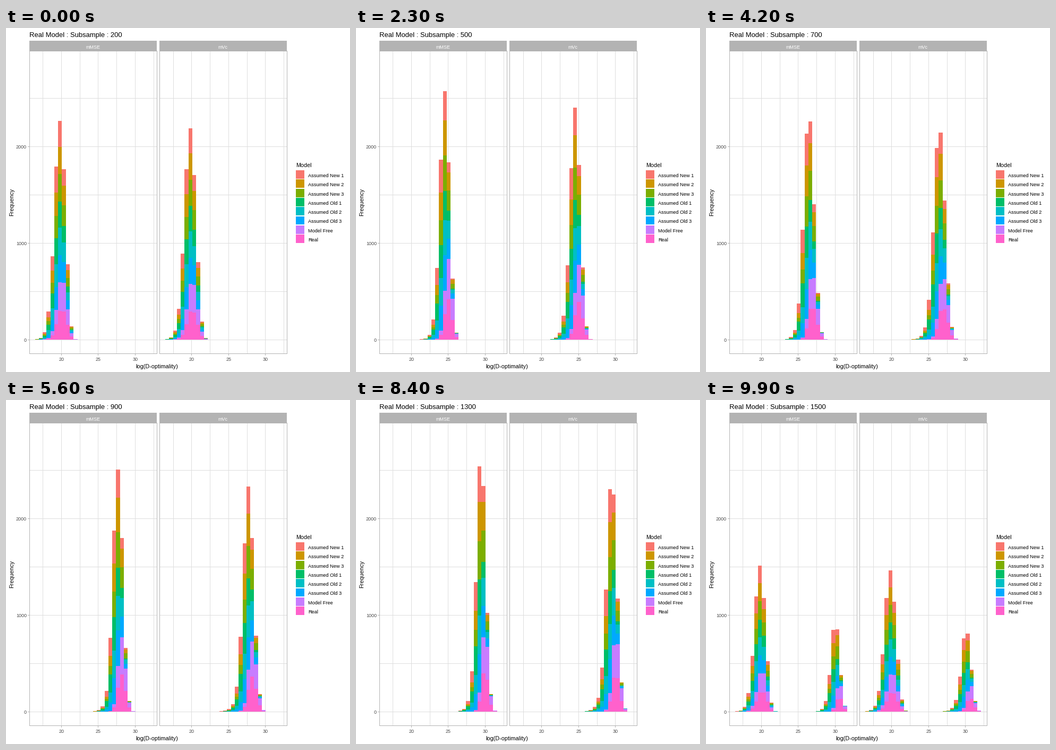
Recreate the animation shown at these times as a matplotlib script. Size 648 by 648 pixels, loop 10000 ms.

```python
import math
import numpy as np
import matplotlib as mpl
import matplotlib.pyplot as plt
from matplotlib.animation import FuncAnimation
from matplotlib.collections import PolyCollection
from matplotlib.patches import Rectangle

mpl.rcParams["font.family"] = "Liberation Sans"

STAGE = 648
GREY, GRID, TICK = "#B3B3B3", "#DEDEDE", "#4D4D4D"
MODELS = ["Assumed New 1", "Assumed New 2", "Assumed New 3", "Assumed Old 1",
          "Assumed Old 2", "Assumed Old 3", "Model Free", "Real"]
COLORS = ["#F8766D", "#CD9600", "#7CAE00", "#00BE67",
          "#00BFC4", "#00A9FF", "#C77CFF", "#FF61CC"]

# Timing in frames of 100 ms: every size holds, then moves to the next one
FRAMES, HOLD = 100, 4
SIZES = range(200, 1600, 100)
STEPS = [4] * 3 + [3] * 11
STARTS = [HOLD * (i + 1) + sum(STEPS[:i]) for i in range(len(STEPS))]

# Histogram geometry in pixels
EDGES = np.arange(31)
BIN_W = 7.278
BASE, PER_COUNT = 587, 0.182

# Each model's offset from the common median, and how much narrower it is
SHIFT = np.array([-.68, -.2, -.07] * 2 + [1.1, 1.03])
SHARP = np.array([.1] * 6 + [.4] * 2)

# growth: median and slope as quadratics in log(size / 200)
PANELS = [
    dict(name="mMSE", left=44.0, first_edge=55.0, bend=.013,
         median=(-.125, 9.95, 6.42), slope=(-.017, .13, .725)),
    dict(name="mVc", left=289.4, first_edge=300.5, bend=.008,
         median=(-.125, 9.99, 6.41), slope=(-.012, .09, .70)),
]

phi = np.vectorize(lambda z: 0.5 * (1 + math.erf(z / math.sqrt(2))))


def bin_shares(mid, slope, tail, bend):
    """Share of a skewed bell curve in each bin: long left tail, short right."""
    u = EDGES - mid
    z = np.where(u < 0, slope * np.arcsinh(tail * u) / tail,
                 slope * u + bend * u ** 3)
    return np.diff(phi(z))


def counts(panel, size):
    """Counts per model and bin for one subsample size."""
    grow = math.log(size / 200)
    mid = np.polyval(panel["median"], grow)
    slope = np.polyval(panel["slope"], grow)
    shape = (.26 + .12 * grow, panel["bend"])
    spread = .5 + .5 * math.sqrt(grow)
    parts = np.array([bin_shares(mid + spread * d, slope * (1 + spread * s), *shape)
                      for d, s in zip(SHIFT, SHARP)]) + 1e-9
    return 8000 * bin_shares(mid, slope, *shape) * parts / parts.sum(axis=0)


STATES = np.array([[counts(p, n) for p in PANELS] for n in SIZES])

fig = plt.figure(figsize=(9, 9), dpi=72, facecolor="white")
ax = fig.add_axes([0, 0, 1, 1])
ax.set_xlim(0, STAGE)
ax.set_ylim(STAGE, 0)
ax.axis("off")


def box(x0, y0, x1, y1, color, z=1):
    ax.add_patch(Rectangle((x0, y0), x1 - x0, y1 - y0, facecolor=color,
                           linewidth=0, antialiased=False, zorder=z))


def label(x, y, s, size, color="black", ha="left", va="baseline", **kw):
    return ax.text(x, y, s, fontsize=size, color=color, ha=ha, va=va,
                   zorder=5, **kw)


def draw_panel(panel):
    x0, top, bottom = int(panel["left"]), 43, 613
    x1 = x0 + 241
    box(x0, 24, x1 - 1, top, GREY)
    label(x0 + 119.5, 39, panel["name"], 9, "white", "center")
    for k in range(6):
        y = int(BASE + 0.5 - 500 * PER_COUNT * k)
        box(x0, y, x1, y + 1, GRID)
    for k in range(7):
        x = int(panel["left"] + 25.85 + 34.7 * k)
        box(x, top, x + 1, bottom, GRID)
        if k % 2:
            box(x, bottom + 1, x + 1, bottom + 4, GREY)
            label(x + 0.5, 627, f"{17.5 + 2.5 * k:.0f}", 9, TICK, "center")
    for x in (x0, x1 - 1):
        box(x, top, x + 1, bottom + 1, GREY, 3)
    for y in (top, bottom):
        box(x0, y, x1, y + 1, GREY, 3)


for p in PANELS:
    draw_panel(p)

for value in (0, 1000, 2000):
    y = int(BASE + 0.5 - PER_COUNT * value)
    box(41, y, 44, y + 1, GREY)
    label(39, y + 4, str(value), 9, TICK, "right")

label(284.5, 641, "log(D-optimality)", 10.7, ha="center")
label(11.5, 328.5, "Frequency", 11, ha="center", va="center", rotation=90)
label(546, 262, "Model", 10.8)
for i, (name, color) in enumerate(zip(MODELS, COLORS)):
    y = 17.28 * i
    box(546, round(268.15 + y), 562, round(284 + y), color)
    label(569, round(281 + y), name, 9.3)

title = label(44, 17, "", 13)
bars = PolyCollection([], facecolors=np.repeat(COLORS * 2, len(EDGES) - 1),
                      linewidths=0, edgecolors="none", antialiaseds=False,
                      zorder=2)
ax.add_collection(bars, autolim=False)


def moment(frame):
    """Counts and titled size at a frame."""
    i = sum(s <= frame for s in STARTS) - 1
    if i < 0:
        return STATES[0], SIZES[0]
    step = min(frame - STARTS[i] + 1, STEPS[i])
    t = step / STEPS[i]
    j = (i + 1) % len(SIZES)
    shown = i if step <= math.ceil(STEPS[i] / 2) else j
    return (1 - t) * STATES[i] + t * STATES[j], SIZES[shown]


def panel_verts(panel, heights):
    """Stack the models upwards from the last one, on whole pixels."""
    tops = np.cumsum(heights[::-1], axis=0)[::-1]
    y1 = BASE - np.round(PER_COUNT * tops)
    y0 = BASE - np.round(PER_COUNT * (tops - heights))
    x = np.floor(panel["first_edge"] + BIN_W * EDGES)
    xa = np.broadcast_to(x[:-1], y0.shape)
    xb = np.broadcast_to(x[1:], y0.shape)
    quads = np.stack([xa, y0, xb, y0, xb, y1, xa, y1], axis=-1)
    return quads.reshape(-1, 4, 2)


def draw(frame):
    heights, size = moment(frame)
    bars.set_verts(np.concatenate(
        [panel_verts(p, h) for p, h in zip(PANELS, heights)]))
    title.set_text(f"Real Model : Subsample : {size}")
    return bars, title


anim = FuncAnimation(fig, draw, frames=FRAMES, interval=100,
                     repeat=True, repeat_delay=0, blit=False)
plt.show()
```
